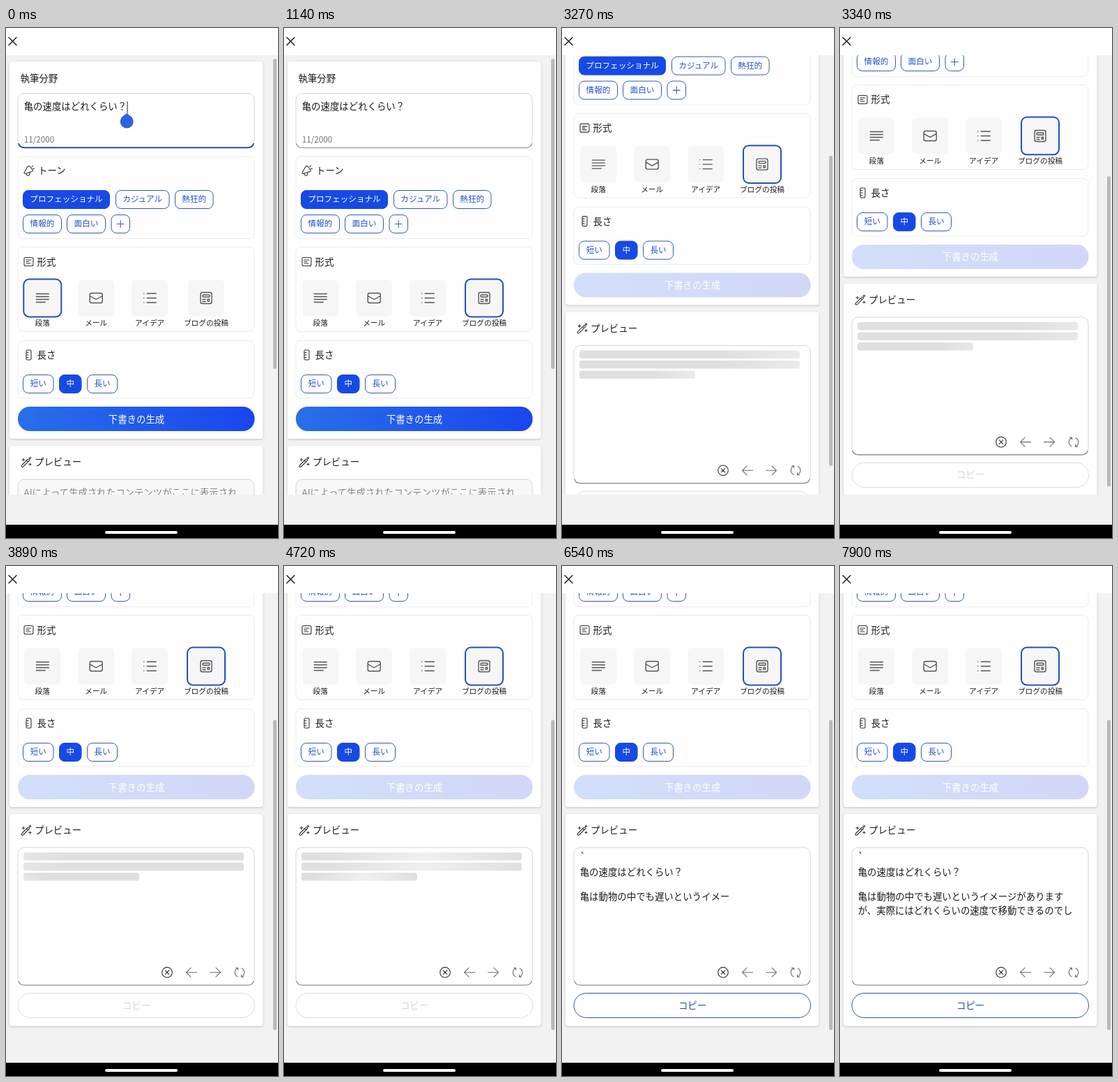
An HTML page for the animation above (8000 ms loop, 390 by 730 pixels).

```html
<!DOCTYPE html>
<html lang="ja">
<head>
<meta charset="utf-8">
<title>下書き</title>
<style>
  html, body { margin: 0; width: 100%; height: 100%; overflow: hidden; background: #f2f2f2; }
  svg { display: block; width: 100vw; height: 100vh; }
  text { font: 13.42px "Noto Sans CJK JP", "Noto Sans CJK", "Noto Sans", sans-serif; fill: #1b1b1b; white-space: pre; }
  .mid { text-anchor: middle; }
  .small { font-size: 10.7px; }
  .chip text { font-size: 11.6px; fill: #2450c8; }
  .chip rect { fill: #fff; stroke: #3459bd; }
  .chip.on rect { fill: #174ae4; stroke: #174ae4; }
  .chip.on text { fill: #fff; }
  .card { fill: #fff; filter: drop-shadow(0 1px 1.5px #0003); }
  .panel { fill: #fefefe; stroke: #ebebeb; }
  .field { fill: #fff; stroke: #d4d4d4; }
  .rim { fill: none; stroke: #858585; stroke-width: 1.2; }
  .icon { fill: none; stroke: #333; stroke-width: 1.1; stroke-linecap: round; stroke-linejoin: round; }
  .tile .icon { stroke: #555; stroke-width: 1.4; }
  .ring { fill: none; stroke: #2450c0; stroke-width: 2; }
  .copy rect { fill: #fff; stroke: #dcdcdc; }
  .copy text { fill: #d0d5e0; }
  .copy.on rect { stroke: #3053b0; }
  .copy.on text { fill: #2450b8; }
</style>
</head>
<body>
<svg id="stage" viewBox="0 0 390 730" preserveAspectRatio="none"></svg>
<script>
const LOOP = 8000, SCROLL_END = 243;
const BLUR = 130, GENERATE = 2130, SETTLE = 2660, SCROLL = 3270, WRITE = 4920;

const rect = (x, y, w, h, r, attrs = '') =>
  `<rect x="${x}" y="${y}" width="${w}" height="${h}" rx="${r}" ${attrs}/>`;
const text = (x, y, s, attrs = '') => `<text x="${x}" y="${y}" ${attrs}>${s}</text>`;
const icon = (x, y, d, attrs = '') =>
  `<path class="icon" transform="translate(${x} ${y})" d="${d}" ${attrs}/>`;
const chip = (x, y, w, label, on) =>
  `<g class="chip${on ? ' on' : ''}">${rect(x + .5, y + .5, w - 1, 26, 7.5)}` +
  `${text(x + w / 2, y + 17.3, label, 'class="mid"')}</g>`;
const tile = (cx, label, d) =>
  `<g class="tile">${rect(cx - 26, 360.5, 52, 52, 6, 'fill="#f6f6f6"')}${icon(cx, 386.5, d)}` +
  `${text(cx, 426, label, 'class="mid small"')}</g>`;
// Bottom edge of a text field, curling up into both corners
const rim = (y, attrs = '') =>
  `<path class="rim" d="M18 ${y - 6}q1 6 9 6h319q8 0 9-6" ${attrs}/>`;
const bar = (y, w) => rect(25, y, w, 11.5, 3.5, 'fill="url(#shimmer)"');

const linear = (id, a, b) =>
  `<linearGradient id="${id}"><stop stop-color="${a}"/><stop offset="1" stop-color="${b}"/></linearGradient>`;

const art = {
  horn: 'M1 10L6 1.5Q7 0 9 1l4 5q1 2-1 2.500L2.500 11.500Q1 11.500 1 10M4 11.500q1 4 4 2.500l1-3.500M12 2l1.500-2M13.500 4.500h2',
  sheet: 'M2 0h9q2 0 2 2v8q0 2-2 2H2q-2 0-2-2V2q0-2 2-2M3 3.500h7M3 6h4M3 8.500h6',
  ruler: 'M1.500 0h4Q7 0 7 1.500v11Q7 14 5.500 14h-4Q0 14 0 12.500v-11Q0 0 1.500 0M0 3.500h3M0 7h3M0 10.500h3',
  wand: 'M1 12L9.500 3.500q1-1 2 0t0 2L3 14q-1 .7-2 0t0-2M8 5l2 2M3.500 2v4M1.500 4h4M13 0v3M11.500 1.500h3M13 9v3M11.500 10.500h3',
  lines: 'M-9-6H9M-9-2H9M-9 2H9M-9 6H4',
  mail: 'M-6.500-7h13q2.500 0 2.500 2.500v9Q9 7 6.500 7h-13Q-9 7-9 4.500v-9Q-9-7-6.500-7M-9-3L0 2 9-3',
  list: 'M-4-6.500H9M-4 0H9M-4 6.500H9M-8.500-6.500h.1M-8.500 0h.1M-8.500 6.500h.1',
  blog: 'M-5.500-8h11Q8-8 8-5.500v11Q8 8 5.500 8h-11Q-8 8-8 5.500v-11Q-8-8-5.500-8M-4-4.500h8q1 0 1 1v1q0 1-1 1h-8q-1 0-1-1v-1q0-1 1-1M-5 2h4M-5 5h4M2 1.800h2.500v2.800H2z',
  close: 'M-7.300 0a7.300 7.300 0 1 0 14.600 0a7.300 7.300 0 1 0-14.600 0M-2.700-2.700l5.400 5.400M2.700-2.700l-5.400 5.400',
  back: 'M7.500 0h-15M-1-6.500L-7.500 0l6.500 6.500',
  next: 'M-7.500 0h15M1-6.500L7.500 0 1 6.500',
  redo: 'M-3 6A6.700 6.700 0 0 1-3-6M-5.500-6.500H-2.500V-3.500M3-6A6.700 6.700 0 0 1 3 6M5.500 6.500H2.500V3.500'
};

const form = `
  ${rect(5, 48, 363.5, 540, 4, 'class="card"')}
  ${text(20.5, 77, '執筆分野')}
  ${rect(17, 93.5, 339, 78, 9, 'class="field"')}
  ${rim(171.5)}${rim(171.2, 'id="focusRim" style="stroke:#1f4fc4;stroke-width:2"')}
  ${text(25.7, 117, '亀の速度はどれくらい？')}
  ${text(25.7, 164, '11/2000', 'style="font-size:11.7px;fill:#707070"')}
  <g id="caret"><path d="M174 105v17" stroke="#222"/>
    <path d="M173.200 122L180 127.300A9.500 9.500 0 1 1 166.400 127.300Z" fill="#2c62e2"/></g>

  ${rect(17, 183.5, 339, 118, 7, 'class="panel"')}
  ${icon(25, 197, art.horn)}${text(46, 209, 'トーン')}
  ${chip(24, 232, 125, 'プロフェッショナル', true)}
  ${chip(157, 232, 77.5, 'カジュアル')}${chip(242, 232, 55.5, '熱狂的')}
  ${chip(24, 267, 56, '情報的')}${chip(87, 267, 56, '面白い')}${chip(150.500, 267, 27.5, '')}
  ${icon(164.2, 280.5, 'M-5 0H5M0-5V5', 'style="stroke:#3459bd"')}

  ${rect(17, 313.5, 339, 121, 7, 'class="panel"')}
  ${icon(26, 328.5, art.sheet)}${text(44.5, 339.5, '形式')}
  ${tile(52.3, '段落', art.lines)}${tile(129.2, 'メール', art.mail)}
  ${tile(206.2, 'アイデア', art.list)}${tile(287, 'ブログの投稿', art.blog)}
  ${rect(-27, 359.6, 54, 53.8, 8, 'id="ring" class="ring"')}

  ${rect(17, 447.5, 339, 82.5, 7, 'class="panel"')}
  ${icon(29, 461, art.ruler)}${text(44.5, 473, '長さ')}
  ${chip(24, 496, 44.5, '短い')}${chip(76, 496, 32.5, '中', true)}${chip(116, 496, 44, '長い')}
  ${rect(17, 542, 339.5, 35, 17, 'id="generate"')}
  ${text(187, 564.5, '下書きの生成', 'class="mid" style="fill:#fff"')}`;

const preview = `
  ${rect(5, 598, 363.5, 303.5, 4, 'class="card"')}
  ${icon(21.5, 614, art.wand)}${text(41, 626.3, 'プレビュー')}
  ${rect(17, 646, 339, 197, 9, 'id="output" class="field"')}${rim(843)}
  ${text(25.5, 670, 'AIによって生成されたコンテンツがここに表示され', 'id="hint" style="fill:#858585"')}
  <g id="skeleton">${bar(653, 316)}${bar(667.5, 316)}${bar(682, 166)}</g>
  <g id="typed">${[664, 686, 721, 741].map(y => text(25.7, y, '')).join('')}</g>
  ${icon(231, 824.7, art.close)}
  ${[[266, 'back'], [300, 'next'], [335, 'redo']]
    .map(([x, name]) => icon(x, 824.7, art[name], 'style="stroke:#6b6b6b"')).join('')}
  <g id="copy">${rect(17, 854.5, 339.5, 35, 17.5)}${text(187, 876.5, 'コピー', 'class="mid"')}</g>`;

const $ = id => document.getElementById(id);
$('stage').innerHTML = `
  <defs>
    ${linear('ready', '#296fe8', '#1946ee')}${linear('busy', '#d2dffa', '#d2d7f8')}
    <linearGradient id="shimmer"><stop offset="0" stop-color="#dfdfdf"/>
      <stop offset=".5" stop-color="#efefef"/><stop offset="1" stop-color="#dfdfdf"/></linearGradient>
    <clipPath id="view"><path d="M0 39H390V668H0z"/></clipPath>
  </defs>
  ${rect(0, 0, 390, 730, 0, 'fill="#f2f2f2"')}
  ${rect(0, 0, 390, 39, 0, 'fill="#fff"')}
  ${icon(9.5, 19, 'M-5.500-5.500l11 11M5.500-5.500l-11 11', 'style="stroke:#111;stroke-width:1.3"')}
  <g clip-path="url(#view)"><g id="page">${form}${preview}</g></g>
  ${rect(383, 44, 5, 444, 2.5, 'id="thumb" fill="#b9b9b9"')}
  ${rect(0, 711, 390, 19, 0, 'fill="#000"')}
  ${rect(142, 720, 104, 4, 2, 'fill="#fff"')}`;

const LINES = ['`', '亀の速度はどれくらい？', '亀は動物の中でも遅いというイメージがあります',
  'が、実際にはどれくらいの速度で移動できるのでし'];
const TOTAL = LINES.join('').length;
const lineNodes = [...$('typed').children];

// Bursts of typing: start, end, number of steps
const typeTimes = [[WRITE, WRITE, 1], [5190, 5260, 2], [5460, 6210, 9], [6340, 6340, 1],
  [6540, 6750, 4], [6950, 7020, 2], [7220, 7220, 1], [7420, 7900, 8]]
  .flatMap(([from, to, n]) => Array.from({ length: n }, (_, i) => from + (to - from) * i / Math.max(1, n - 1)));

const show = (id, on) => $(id).setAttribute('visibility', on ? 'visible' : 'hidden');

function scrollAt(t) {
  if (t < SETTLE) return 0;
  if (t < SCROLL) return .5;
  const step = 1 + Math.floor((t - SCROLL) / 69);
  return SCROLL_END * (1 - Math.exp(-1.55 * step));
}

function drawShimmer(t) {
  const held = t < SETTLE ? GENERATE : t < SCROLL ? SETTLE : t - (t - SCROLL) % 69;
  const center = -.5 + 2 * ((held - SETTLE + 5000) / 2000 % 1);
  $('shimmer').setAttribute('x1', center - .45);
  $('shimmer').setAttribute('x2', center + .45);
}

function drawTyping(t) {
  const last = typeTimes.filter(at => at <= t).length - 1;
  let left = last < 0 ? 0 : Math.ceil(1 + (TOTAL - 1) * last / (typeTimes.length - 1));
  LINES.forEach((line, i) => {
    lineNodes[i].textContent = line.slice(0, Math.max(0, left));
    left -= line.length;
  });
}

function draw(t) {
  const scroll = scrollAt(t), busy = t >= GENERATE;
  $('page').setAttribute('transform', `translate(0 ${-scroll})`);
  $('thumb').setAttribute('y', 44 + scroll * .725);
  show('caret', t < BLUR);
  show('focusRim', t < BLUR);
  $('ring').setAttribute('transform', `translate(${t < BLUR ? 52.3 : 287} 0)`);
  $('generate').setAttribute('fill', `url(#${busy ? 'busy' : 'ready'})`);
  $('output').style.fill = busy ? '#fff' : '#f8f8f8';
  show('hint', !busy);
  show('skeleton', busy && t < WRITE);
  $('copy').setAttribute('class', t >= WRITE ? 'copy on' : 'copy');
  drawShimmer(t);
  drawTyping(t);
}

const start = performance.now();
function tick() {
  draw((performance.now() - start) % LOOP);
  requestAnimationFrame(tick);
}
tick();
</script>
</body>
</html>
```
